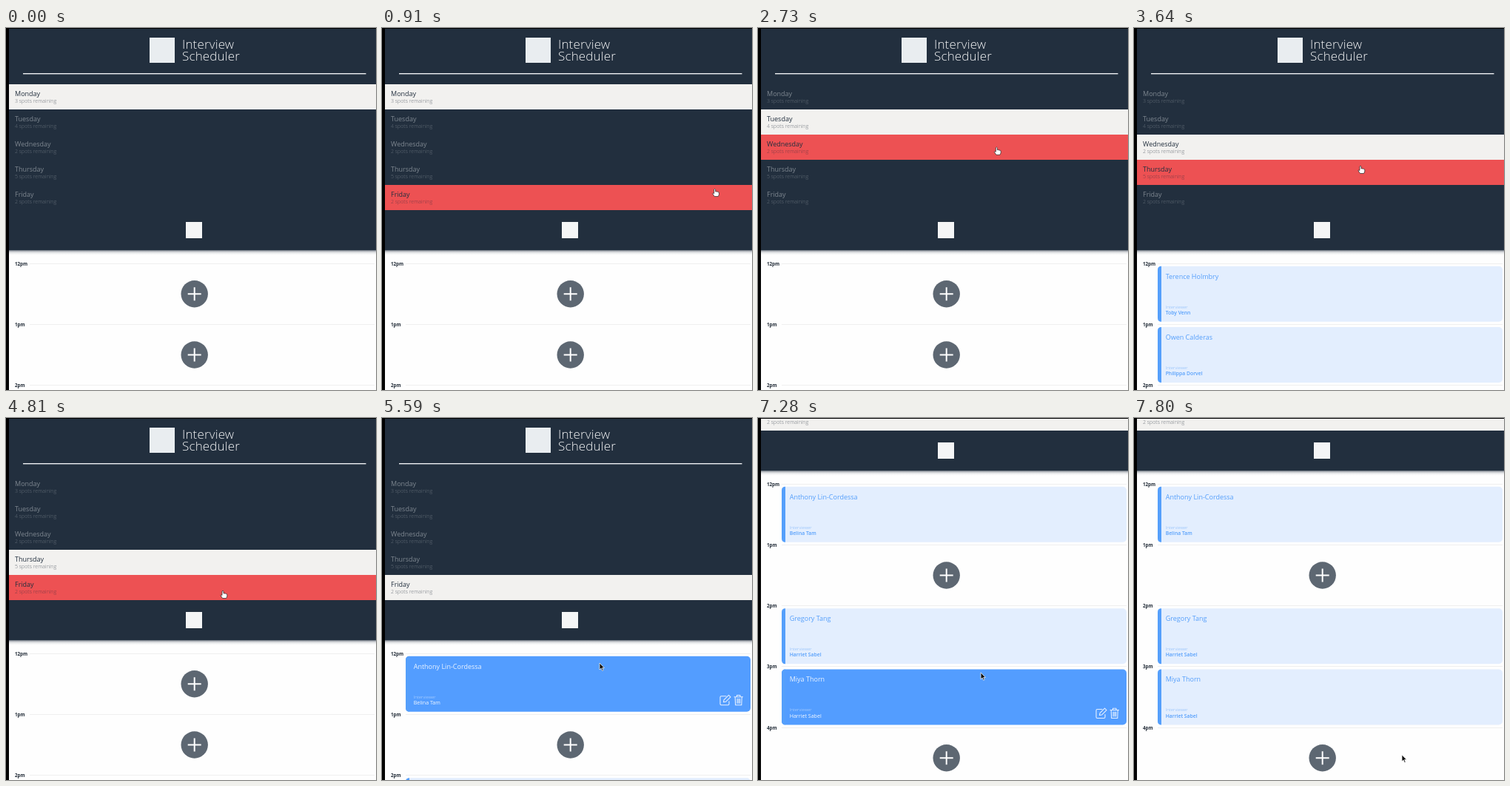
An HTML page that plays this animation: 500 px wide and 489 px high, repeating every 8060 ms.

```html
<!DOCTYPE html>
<html lang="en">
<head>
<meta charset="utf-8">
<title>Interview Scheduler</title>
<style>
  html, body { margin: 0; width: 100%; height: 100%; overflow: hidden; background: #fefefe; }
  svg { display: block; width: 500px; height: 489px; font-family: "Open Sans", "Noto Sans", sans-serif; }
  .title { font-size: 17px; font-weight: 300; letter-spacing: .15px; fill: #f4f5f6; }

  .row rect { fill: #222f3e; }
  .row .day { font-size: 9px; fill: #7e8790; }
  .row .spots { font-size: 7px; font-weight: 300; fill: #66707b; }
  .row.hover rect { fill: #ed5153; }
  .row.hover .day { fill: #222f3e; }
  .row.hover .spots { fill: #7c3c46; }
  .row.selected rect { fill: #f2f1ef; }
  .row.selected .day { fill: #222f3e; }
  .row.selected .spots { fill: #6d737b; }

  .hour { font-size: 6.2px; font-weight: 700; fill: #1d2733; }
  .rule { stroke: #efefef; }
  .add circle { fill: #5d6772; }
  .add path { stroke: #fff; stroke-width: 2; }

  .panel { display: none; }
  .panel.open { display: inline; }
  .card .body { fill: #e3eefe; }
  .card .edge { fill: #559ffb; }
  .card .name { font-size: 9px; fill: #559ffb; }
  .card .label { font-size: 6px; font-weight: 300; fill: #7fb5fa; }
  .card .host { font-size: 6.8px; font-weight: 600; fill: #559ffb; }
  .card .tools { display: none; fill: none; stroke: #e6f0ff; stroke-width: 1.1; stroke-linejoin: round; stroke-linecap: round; }
  .card.hover .body { fill: #539dff; }
  .card.hover .name { fill: #eaf3ff; }
  .card.hover .label { fill: #c3dcff; }
  .card.hover .host { fill: #f2f7ff; font-weight: 400; font-size: 7.1px; }
  .card.hover .tools { display: inline; }
</style>
</head>
<body>
<svg viewBox="0 0 500 489">
  <defs>
    <linearGradient id="fade" x2="0" y2="1">
      <stop offset="0" stop-color="#5b6470" stop-opacity=".75"/>
      <stop offset=".35" stop-color="#8a9098" stop-opacity=".3"/>
      <stop offset="1" stop-color="#fff" stop-opacity="0"/>
    </linearGradient>
  </defs>
  <rect width="500" height="489" fill="#fefefe"/>
  <g id="page">
    <rect width="500" height="300.5" fill="#222f3e"/>
    <rect y="300.5" width="500" height="7" fill="url(#fade)"/>
    <rect x="194" y="13" width="34" height="34" fill="#e9edf0"/>
    <text class="title" x="238" y="28">Interview</text>
    <text class="title" x="238" y="44.3">Scheduler</text>
    <rect x="23" y="61" width="463.5" height="1.4" fill="#eef0f2"/>
    <g id="rows"></g>
    <rect x="243" y="262" width="22" height="22" fill="#f4f5f6"/>
    <g id="hours"></g>
    <g id="panels"></g>
  </g>
  <rect width="4" height="489" fill="#000"/>
  <rect width="500" height="1" fill="#000"/>
  <g id="cursor" stroke="#222" stroke-width=".7" stroke-linejoin="round">
    <path id="arrow" fill="#111" stroke="#fff" d="M0 0V9L2.1 7.1 3.6 10.4 5.1 9.7 3.6 6.6H6.4Z"/>
    <path id="hand" fill="#fff" d="M-1 1Q0-.6 1 1V4Q2 3.2 2.8 4.2 3.8 3.5 4.5 4.6 5.8 4.3 5.8 5.8V8L4.6 10.5H-.4L-3 6.8Q-3 5.2-1 6.4Z"/>
  </g>
</svg>
<script>
const LOOP = 8060, STEP = 130;
const ROW_TOP = 76, ROW_H = 34, HOUR_TOP = 318.2, HOUR_H = 82.25;
const DAYS = [["Monday", 3], ["Tuesday", 4], ["Wednesday", 2], ["Thursday", 5], ["Friday", 2]];
const HOURS = ["12pm", "1pm", "2pm", "3pm", "4pm"];
// bookings[day][hour] = [guest, interviewer]
const bookings = {
  2: { 0: ["Terence Holmbry", "Toby Venn"], 1: ["Owen Calderas", "Philippa Dorvel"] },
  4: { 0: ["Anthony Lin-Cordessa", "Belina Tam"], 2: ["Gregory Tang", "Harriet Sabel"], 3: ["Miya Thorn", "Harriet Sabel"] }
};
const selectTimes = [0, 2210, 3120, 4030, 5070];
// [time, x, y] of the pointer tip
const path = [
  [390, 512, 260], [1690, 335, 138], [2340, 335, 138], [2860, 320, 165],
  [3120, 320, 165], [3640, 306, 186], [4290, 306, 186], [4810, 293, 233],
  [5200, 293, 233], [5590, 294, 331], [7150, 294, 331], [7800, 362, 455]
];
const scrollKeys = [[5720, 0], [6110, 229]];

const $ = id => document.getElementById(id);
const hourY = i => HOUR_TOP + i * HOUR_H;

const row = ([day, spots], i) => {
  const y = ROW_TOP + i * ROW_H;
  return `<g class="row"><rect y="${y}" width="500" height="${ROW_H}"/>
    <text class="day" x="12" y="${y + 15.7}">${day}</text>
    <text class="spots" x="12" y="${y + 25.3}">${spots} spots remaining</text></g>`;
};

const hour = (name, i) => `<text class="hour" x="12" y="${hourY(i) + 2.3}">${name}</text>
  <path class="rule" d="M32 ${Math.floor(hourY(i)) + .5}H498"/>`;

const add = y => `<g class="add" transform="translate(254.7 ${y + 41})"><circle r="18.2"/><path d="M-9 0H9M0-9V9"/></g>`;

const card = ([guest, host], y) => `<g class="card" data-top="${y + 3.6}" transform="translate(32 ${y + 3.6})">
  <rect class="body" width="466" height="75" rx="5"/>
  <path class="edge" d="M5 0V75Q0 75 0 70V5Q0 0 5 0Z"/>
  <text class="name" x="10.7" y="16.8">${guest}</text>
  <text class="label" x="10.7" y="56.8">Interviewer</text>
  <text class="host" x="10.7" y="65.2">${host}</text>
  <g class="tools">
    <path d="M433 54H426.5Q425 54 425 55.5V64.500Q425 66 426.500 66H435.500Q437 66 437 64.500V61M429.500 62L430 59 436.500 52.500 439 55 432.500 61.500Z"/>
    <path d="M444 55H455.500M447.500 55V52.700H452V55M445.200 55L445.700 66H453.800L454.300 55M448 57.500V63.500M449.800 57.500V63.500M451.600 57.500V63.500"/>
  </g></g>`;

const panel = (_, d) => `<g class="panel">${HOURS.map((_, h) => {
  const booked = (bookings[d] || {})[h];
  return booked ? card(booked, hourY(h)) : add(hourY(h));
}).join("")}</g>`;

$("rows").innerHTML = DAYS.map(row).join("");
$("hours").innerHTML = HOURS.map(hour).join("");
$("panels").innerHTML = DAYS.map(panel).join("");
const rows = [...document.querySelectorAll(".row")];
const panels = [...document.querySelectorAll(".panel")];
const cards = [...document.querySelectorAll(".card")];

const smooth = p => p * p * (3 - 2 * p);

// Eased values at time t from [time, ...values] keys
function at(keys, t) {
  const next = keys.findIndex(k => k[0] > t);
  if (next === 0) return keys[0].slice(1);
  if (next < 0) return keys[keys.length - 1].slice(1);
  const a = keys[next - 1], b = keys[next];
  const p = smooth((t - a[0]) / (b[0] - a[0]));
  return a.slice(1).map((v, i) => v + (b[i + 1] - v) * p);
}

function draw(t) {
  const [x, y] = at(path, t);
  const [scroll] = at(scrollKeys, t);
  const pageY = y + scroll;
  const selected = selectTimes.filter(s => s <= t).length - 1;
  const onStage = x < 500;
  const over = onStage ? Math.floor((pageY - ROW_TOP) / ROW_H) : -1;

  rows.forEach((el, i) => {
    el.classList.toggle("selected", i === selected);
    el.classList.toggle("hover", i === over && i !== selected);
  });
  panels.forEach((el, i) => el.classList.toggle("open", i === selected));
  cards.forEach(el => {
    const dy = pageY - el.dataset.top;
    el.classList.toggle("hover", onStage && dy >= 0 && dy <= 75);
  });

  const onRow = over >= 0 && over < DAYS.length;
  $("hand").style.display = onRow ? "" : "none";
  $("arrow").style.display = onRow ? "none" : "";
  $("cursor").setAttribute("transform", `translate(${x} ${y})`);
  $("page").setAttribute("transform", `translate(0 ${-scroll})`);
}

const start = performance.now();
function tick() {
  const t = (performance.now() - start) % LOOP;
  draw(Math.floor(t / STEP) * STEP);
  requestAnimationFrame(tick);
}
tick();
</script>
</body>
</html>
```
